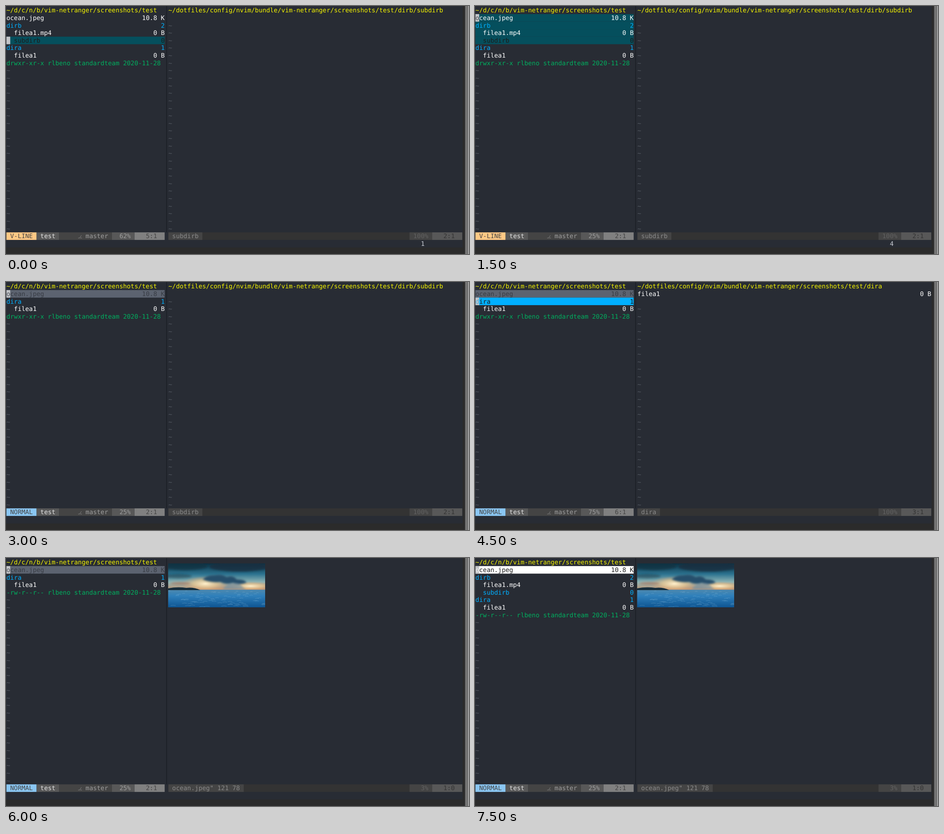
These frames come from a looping animation (1022 px wide and 548 px high, 9 s). An HTML page:

```html
<!DOCTYPE html>
<html lang="en">
<head>
<meta charset="utf-8">
<title>File manager demo</title>
<style>
  html, body { margin: 0; width: 100%; height: 100%; overflow: hidden; background: #2b2b2b; }
  svg { display: block; width: 1022px; height: 548px; }
  text {
    font: 13.81px "DejaVu Sans Mono", monospace;
    text-rendering: geometricPrecision;
    white-space: pre;
  }
</style>
</head>
<body>
<svg viewBox="0 0 1022 548">
  <defs>
    <linearGradient id="sky" x2="0" y2="1">
      <stop offset="0" stop-color="#0c3042"/>
      <stop offset=".4" stop-color="#2c7390"/>
      <stop offset=".7" stop-color="#8fb4b4"/>
      <stop offset="1" stop-color="#c4936f"/>
    </linearGradient>
    <linearGradient id="sea" x2="0" y2="1">
      <stop offset="0" stop-color="#4d88ae"/>
      <stop offset=".35" stop-color="#2f80bb"/>
      <stop offset="1" stop-color="#0e5592"/>
    </linearGradient>
    <radialGradient id="glow">
      <stop offset="0" stop-color="#fff0cc"/>
      <stop offset=".5" stop-color="#efc890" stop-opacity=".7"/>
      <stop offset="1" stop-color="#d99a6a" stop-opacity="0"/>
    </radialGradient>
    <clipPath id="photoBox"><rect x="358" y="12" width="214" height="97"/></clipPath>
    <filter id="soft" x="-20%" y="-50%" width="140%" height="200%"><feGaussianBlur stdDeviation="2"/></filter>
    <g id="photo" clip-path="url(#photoBox)">
      <rect x="358" y="12" width="214" height="59" fill="url(#sky)"/>
      <ellipse cx="440" cy="57" rx="52" ry="17" fill="url(#glow)"/>
      <ellipse cx="540" cy="62" rx="52" ry="10" fill="url(#glow)"/>
      <g fill="#143140" filter="url(#soft)">
        <ellipse cx="395" cy="18" rx="50" ry="9" opacity=".75"/>
        <ellipse cx="515" cy="19" rx="66" ry="11" opacity=".85"/>
        <ellipse cx="380" cy="40" rx="30" ry="5" opacity=".45"/>
        <ellipse cx="385" cy="56" rx="22" ry="3" fill="#a87762" opacity=".7"/>
        <path d="M434 47q10-10 27-9 15-3 26 4 14-5 22 5 18 0 22 7-18 7-30 1-14 5-28-2-22 2-39-6z" fill="#28506c"/>
        <path d="M478 70q8-13 21-13 16-4 23 7l8 6z" fill="#7590a0" opacity=".7"/>
      </g>
      <rect x="358" y="70" width="214" height="39" fill="url(#sea)"/>
      <path d="M358 71v-4q20-4 40-1 16-2 31 5z" fill="#172e3c"/>
      <path id="waves" fill="none" stroke="#8bbcdc" stroke-width=".8" opacity=".4"/>
    </g>
  </defs>
  <rect width="1022" height="548" fill="#2b2b2b"/>
  <rect width="1008" height="533.5" fill="#282c34"/>
  <rect x="1013" width="8" height="548" fill="#747474"/>
  <path d="M1013.5 0v548" stroke="#565656"/>
  <path d="M1021.5 0v548" stroke="#d8d8d8"/>
  <g id="screen"></g>
</svg>
<script>
const CW = 8.315, RH = 16.633, LEFT = 1, TOP = 1.2;
const STEP = 1500;
const SPLIT = 43, LEFT_END = 42, RIGHT_END = 121;
const STATUS = 30, COMMAND = 31;
const C = {
  white: "#ffffff", blue: "#00afff", green: "#00af5f", yellow: "#f4f400",
  tilde: "#555a63", dark: "#1c1c1c", visual: "#054f5d", picked: "#5c6370",
  pickedText: "#383c44", cursor: "#c3c5c8"
};

const x = col => LEFT + col * CW;
const y = row => TOP + row * RH;
const esc = s => s.replace(/&/g, "&amp;").replace(/</g, "&lt;");

function box(col, row, cols, fill) {
  return `<rect x="${x(col)}" y="${y(row)}" width="${cols * CW}" height="${RH + .05}" fill="${fill}"/>`;
}

function text(col, row, s, fill) {
  return `<text x="${x(col)}" y="${y(row) + 13.1}" fill="${fill}">${esc(s)}</text>`;
}

// One listing line: name on the left, size flush right
function entry(start, end, row, [name, size], fill) {
  return text(start, row, name, fill) + text(end - size.length, row, size, fill);
}

function tildes(col, from) {
  let out = "";
  for (let row = from; row < STATUS; row++) out += text(col, row, "~", C.tilde);
  return out;
}

const ocean = ["ocean.jpeg", "10.8 K"];
const dira = ["dira", "1", true];
const filea = ["  filea1", "0 B"];
const full = [ocean, ["dirb", "2", true], ["  filea1.mp4", "0 B"], ["  subdirb", "0", true], dira, filea];
const short = [ocean, dira, filea];

const ROOT = "~/dotfiles/config/nvim/bundle/vim-netranger/screenshots/test";
const subdirb = { path: ROOT + "/dirb/subdirb", name: "subdirb", files: [], percent: "100%", pos: "2:1" };
const diraPane = { path: ROOT + "/dira", name: "dira", files: [["filea1", "0 B"]], percent: "100%", pos: "3:1" };
const preview = { photo: true, name: 'ocean.jpeg" 121 78', percent: "3%", pos: "1:0" };

const visual = { bg: C.visual };
const subVisual = { bg: C.visual, fg: C.dark };
const picked = { bg: C.picked, fg: C.pickedText };
const DIR = "drwxr-xr-x", FILE = "-rw-r--r--";

// marks: row number -> highlight; under: colour of the letter below the cursor
const scenes = [
  { list: full, marks: { 4: subVisual }, cursor: 4, mode: "V-LINE", perm: DIR,
    percent: "62%", pos: "5:1", pane: subdirb, count: "1" },
  { list: full, marks: { 1: visual, 2: visual, 3: visual, 4: subVisual }, cursor: 1, under: "#4c5158",
    mode: "V-LINE", perm: DIR, percent: "25%", pos: "2:1", pane: subdirb, count: "4" },
  { list: short, marks: { 1: picked }, cursor: 1, under: "#50545c", mode: "NORMAL", perm: DIR,
    percent: "25%", pos: "2:1", pane: subdirb },
  { list: short, marks: { 1: picked, 2: { bg: C.blue, fg: C.dark } }, cursor: 2, under: "#44aee0",
    mode: "NORMAL", perm: DIR, percent: "75%", pos: "6:1", pane: diraPane },
  { list: short, marks: { 1: picked }, cursor: 1, under: "#50545c", mode: "NORMAL", perm: FILE,
    percent: "25%", pos: "2:1", pane: preview },
  { list: full, marks: { 1: { bg: C.white, fg: C.dark } }, cursor: 1, under: "#eeeeee", mode: "NORMAL",
    perm: FILE, percent: "25%", pos: "2:1", pane: preview }
];

function leftPane(s) {
  let out = text(0, 0, "~/d/c/n/b/vim-netranger/screenshots/test", C.yellow);
  s.list.forEach((item, i) => {
    const row = i + 1, mark = s.marks[row] || {};
    if (mark.bg) out += box(0, row, LEFT_END, mark.bg);
    out += entry(0, LEFT_END, row, item, mark.fg || (item[2] ? C.blue : C.white));
  });
  out += box(0, s.cursor, 1, C.cursor);
  if (s.under) out += text(0, s.cursor, s.list[s.cursor - 1][0][0], s.under);
  const info = s.list.length + 1;
  return out + text(0, info, s.perm + " rlbeno standardteam 2020-11-28", C.green) + tildes(0, info + 1);
}

function rightPane(p) {
  if (p.photo) return '<use href="#photo"/>';
  let out = text(SPLIT, 0, p.path, C.yellow);
  p.files.forEach((f, i) => out += entry(SPLIT, RIGHT_END, i + 1, f, C.white));
  return out + tildes(SPLIT, p.files.length + 2);
}

function branchIcon() {
  return `<path transform="translate(${x(19)} ${y(STATUS)})" d="M.5 12.5h3l4-6M5 12.5h3.5" fill="none" stroke="#8c8c8c" stroke-width=".9"/>`;
}

function statusBars(s) {
  const bar = (col, cols, bg, at, label, fg) => box(col, STATUS, cols, bg) + text(at, STATUS, label, fg);
  const p = s.pane, nameCols = p.name.length + 2;
  return bar(0, 8, s.mode === "NORMAL" ? "#8ac6f2" : "#ffc985", 1, s.mode, "#444444")
    + bar(8, 6, "#585858", 9, "test", "#e4e4e4")
    + bar(14, 14, "#444444", 21, "master", "#9e9e9e") + branchIcon()
    + bar(28, 6, "#585858", 30, s.percent, "#9e9e9e")
    + bar(34, 8, "#808080", 37, s.pos, "#444444")
    + box(SPLIT, STATUS, RIGHT_END - SPLIT, "#333333")
    + bar(SPLIT, nameCols, "#444444", SPLIT + 1, p.name, "#8a8a8a")
    + bar(107, 6, "#444444", 112 - p.percent.length, p.percent, "#626262")
    + bar(113, 8, "#585858", 116, p.pos, "#333333");
}

function draw(s) {
  const split = `<rect x="353.5" width="2" height="${y(STATUS)}" fill="#1d2027"/>`;
  return leftPane(s) + split + rightPane(s.pane) + statusBars(s)
    + (s.count ? text(110, COMMAND, s.count, "#c8ccd4") : "");
}

// Ripples widen towards the viewer
let ripples = "";
for (let i = 0; i < 85; i++) {
  const px = 358 + (i * i * 37.3) % 208, py = 73 + 35 * i / 85;
  ripples += `M${px.toFixed(1)} ${py.toFixed(1)}q${3 + i / 25}-1.5 ${5 + i / 12} 0`;
}
document.getElementById("waves").setAttribute("d", ripples);

const screenEl = document.getElementById("screen");
let shown = -1;

function update(now) {
  const index = Math.floor(now / STEP) % scenes.length;
  if (index !== shown) {
    screenEl.innerHTML = draw(scenes[index]);
    shown = index;
  }
}

const begin = performance.now();
function tick() {
  update(performance.now() - begin);
  requestAnimationFrame(tick);
}
tick();
</script>
</body>
</html>
```
